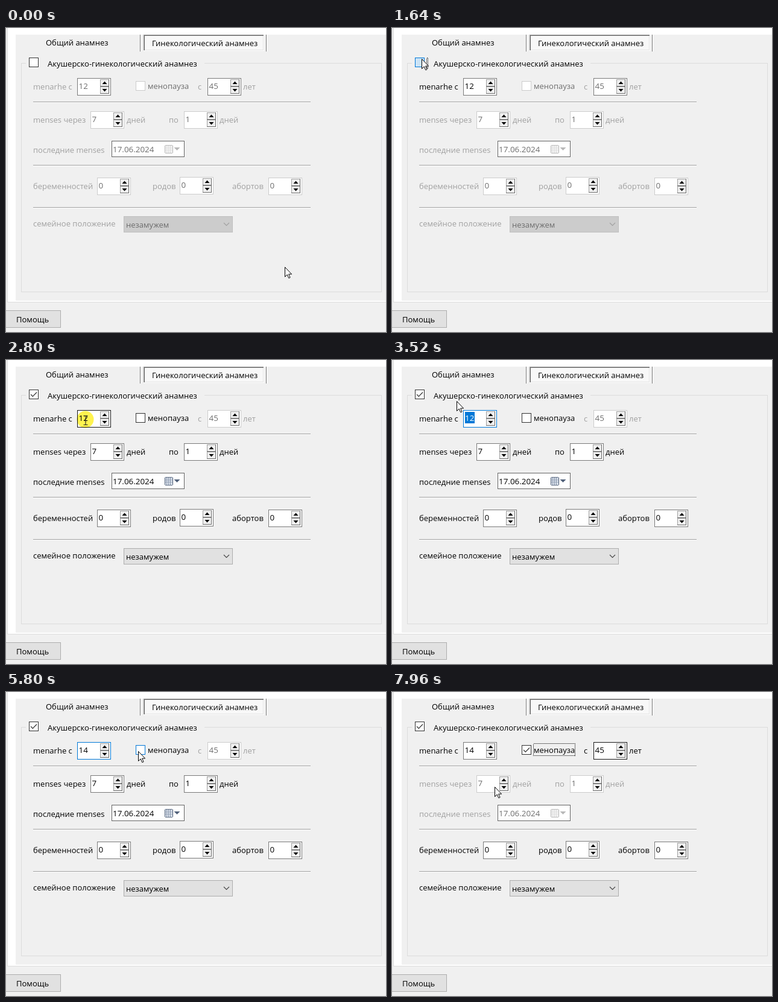
An HTML page for the animation above (8000 ms loop, 630 by 504 pixels).

```html
<!DOCTYPE html>
<html lang="ru">
<head>
<meta charset="utf-8">
<style>
html, body { margin: 0; width: 100%; height: 100%; overflow: hidden; background: #f0f0f0; }
svg { display: block; width: 630px; height: 504px; }
text { font: 13px "Open Sans", "Noto Sans", sans-serif; white-space: pre; }
.num { font-size: 13.4px; }
.glow { mix-blend-mode: multiply; }
rect { shape-rendering: crispEdges; }
</style>
</head>
<body>
<svg id="stage" viewBox="0 0 630 504"></svg>
<script>
const LOOP = 8000, STEP = 40, DIGIT = 7.6;
const BLACK = '#000', INK = '#333', BLUE = '#0078d7', GREY = '#a0a0a0', DIM = '#6d6d6d';
const EDGE = '#7a7a7a', PALE = '#cccccc', HOVER = '#171717', PRESSED = '#cce4f7';

// Pointer moves: start, end, target x, target y, sideways overshoot
const HOME = [462, 396];
const MOVES = [
  [80, 280, 462, 391, 0],
  [440, 1200, 49, 51, 1.4],
  [2160, 2520, 132, 100, 0],
  [2800, 3160, 107, 68, 0],
  [4000, 4960, 140, 56, 0],
  [5000, 5800, 219, 98, 5.1],
  [6320, 7160, 364, 94, 0],
  [7600, 7720, 236, 153, 0],
  [7840, 7960, 170, 157, 0]
];

const within = (t, a, b) => t >= a && t < b;
const smooth = k => k * k * (3 - 2 * k);

function pointerAt(t) {
  let [x, y] = HOME;
  for (const [start, end, tx, ty, over] of MOVES) {
    if (t < start) break;
    const k = Math.min(1, (t - start) / (end - start)), e = smooth(k);
    x += (tx - x) * (e + over * k * k * (1 - k));
    y += (ty - y) * e;
  }
  return [Math.round(x), Math.round(y)];
}

const fill = (x, y, w, h, c) => `<rect x="${x}" y="${y}" width="${w}" height="${h}" fill="${c}"/>`;
const box = (x, y, w, h, c, line, extra = '') =>
  `<rect x="${x + .5}" y="${y + .5}" width="${w - 1}" height="${h - 1}" fill="${c}" stroke="${line}" ${extra}/>`;
const text = (x, y, s, c = BLACK, cls = '') => `<text x="${x}" y="${y}" fill="${c}" class="${cls}">${s}</text>`;
const path = (d, c, line = 'none', width = 1) => `<path d="${d}" fill="${c}" stroke="${line}" stroke-width="${width}"/>`;
const dotted = (x, y, w, h) => box(x, y, w, h, 'none', BLACK, 'stroke-dasharray="1 1"');
const ink = on => on ? BLACK : GREY;
const edge = on => on ? EDGE : PALE;

function spinButton(x, y, dir) {
  return fill(x, y, 15, 12, '#696969') + fill(x, y, 14, 11, GREY) + fill(x + 1, y + 1, 13, 10, '#f0f0f0') +
    path(`M${x + 3.5} ${y + 6 + 2 * dir}h8l-4 ${-4.5 * dir}z`, BLACK);
}

function spin(x, y, value, on, line = edge(on)) {
  return box(x, y, 56, 29, '#fff', line) + text(x + 2.5, y + 17.5, value, on ? BLACK : DIM, 'num') +
    spinButton(x + 38, y + 2, 1) + spinButton(x + 38, y + 14, -1);
}

function check(x, y, on, line, bg = '#fff') {
  return box(x, y, 16, 16, bg, line) +
    (on ? path(`M${x + 3} ${y + 8}l3.3 3.3l6.7-6.8`, 'none', line, 1.2) : '');
}

function sunken(x, y, w, h) {
  return fill(x, y, w, h, '#fff') + fill(x, y, w - 1, h - 1, GREY) + fill(x + 1, y + 1, w - 2, h - 2, '#696969') +
    fill(x + 2, y + 2, w - 3, h - 3, '#e3e3e3') + fill(x + 2, y + 2, w - 4, h - 4, '#f8f8f8');
}

function frame() {
  let s = fill(0, 0, 630, 504, '#f0f0f0') + fill(2, 0, 628, 455, '#dcdcdc') +
    fill(3, 0, 627, 454, '#fff') + fill(16, 11, 614, 441, '#f0f0f0');
  for (const x of [222, 431]) s += fill(x, 11, 1, 28, EDGE) + fill(x + 1, 11, 1, 28, '#fff');
  s += sunken(228, 11, 200, 27) + text(66, 29, 'Общий анамнез') + text(242, 30, 'Гинекологический анамнез');
  s += box(25, 58, 598, 380, 'none', '#dcdcdc') + fill(33, 56, 296, 5, '#f0f0f0') +
    text(69, 64, 'Акушерско-гинекологический анамнез');
  for (const y of [122, 227, 297]) s += fill(45, y, 460, 1, GREY) + fill(45, y + 1, 460, 1, '#fff');
  return s + box(-1, 468, 92, 29, '#e1e1e1', '#adadad') + text(17, 488, 'Помощь');
}

function dateBox(on) {
  const line = on ? '#51617a' : '#b8b8b8', grid = on ? '#8f9db2' : '#e0e0e0';
  let s = box(175, 187, 121, 27, '#fff', '#646464') + text(177, 205.5, '17.06.2024', on ? BLACK : DIM, 'num') +
    box(263, 194, 14, 14, on ? '#e4eaf2' : '#f4f4f4', line, 'rx="2"');
  for (let i = 0; i < 3; i++) s += fill(264, 197 + i * 3, 12, 1, grid) + fill(266 + i * 3, 195, 1, 12, grid);
  return s + path('M278.5 198h10l-5 5z', line);
}

function combo(on) {
  return box(195, 312, 181, 27, on ? '#e1e1e1' : PALE, on ? '#adadad' : '#bfbfbf') +
    text(199, 331, 'незамужем', on ? BLACK : DIM) +
    path('M361 323l4.5 4.5l4.5-4.5', 'none', on ? '#444' : GREY, 1.1);
}

function form(t) {
  const first = t >= 1600, all = t >= 1720, meno = t >= 6400, cycle = all && !meno;
  const value = t < 4000 ? '12' : t < 4240 ? '1' : '14';
  const ageLine = within(t, 2400, 2880) ? HOVER : within(t, 2880, 6320) ? BLUE : EDGE;
  const endLine = t >= 7120 ? HOVER : edge(!cycle);
  const menoLine = within(t, 5600, 7160) ? BLUE : all ? INK : PALE;

  let s = check(38, 49, all, within(t, 1160, 2280) ? BLUE : INK, within(t, 1480, 1720) ? PRESSED : '#fff');
  if (within(t, 80, 2800)) s += dotted(57, 49, 3, 18);

  s += text(45, 102, 'menarhe с', ink(first)) + spin(118, 83, value, first, ageLine) +
    check(215, 88, meno, menoLine, within(t, 6280, 6400) ? PRESSED : '#fff') +
    text(235, 101, 'менопауза', all ? BLACK : DIM) + text(318, 102, 'с', ink(meno)) +
    spin(334, 83, '45', meno, endLine) + text(393, 102, 'лет', ink(meno));
  if (t >= 6320) s += dotted(234, 85, 70, 21);

  s += text(45, 157, 'menses через', ink(cycle)) + spin(140, 138, '7', cycle) + text(200, 157, 'дней', ink(cycle)) +
    text(270, 157, 'по', ink(cycle)) + spin(295, 138, '1', cycle) + text(354, 157, 'дней', ink(cycle)) +
    text(45, 207, 'последние menses', ink(cycle)) + dateBox(cycle);

  s += text(45, 267, 'беременностей', ink(all)) + spin(151, 248, '0', all) +
    text(243, 267, 'родов', ink(all)) + spin(288, 247, '0', all) +
    text(375, 267, 'абортов', ink(all)) + spin(435, 248, '0', all);
  return s + text(45, 329, 'семейное положение', ink(all)) + combo(all);
}

function editing(t) {
  let s = '';
  if (within(t, 2920, 4000)) {
    const from = t < 3000 ? 1 : 0, x = 121 + from * DIGIT;
    s += fill(x, 86, 137 - x, 19, BLUE) + text(x, 100.5, '12'.slice(from), '#fff', 'num');
  }
  const typed = t < 4000 ? 0 : t < 4240 ? 1 : 2;
  const caret = within(t, 3000, 3520) || within(t, 4000, 4720) || within(t, 5200, 5720);
  return caret ? s + fill(Math.round(121.5 + typed * DIGIT), 86, 1, 19, BLACK) : s;
}

function pointer(t) {
  if (within(t, 4000, 5000)) return '';
  const [x, y] = pointerAt(t), drag = within(t, 2800, 3120);
  let s = '';
  if (drag || within(t, 1440, 1600) || within(t, 6280, 6400))
    s += `<circle class="glow" cx="${x - .5}" cy="${y - 1.5}" r="14" fill="#fff23c" opacity=".9"/>`;
  if (drag || within(t, 2440, 2800) || within(t, 7000, 7640))
    return s + path(`M${x - 3.5} ${y - 7.5}h3l.5 .5l.5-.5h3M${x} ${y - 7}v14M${x - 3.5} ${y + 7.5}h3l.5-.5l.5 .5h3`,
      'none', '#222', 1.1);
  return s + path(`M${x + .5} ${y + .5}v16l3.7-3.6l2.6 5.8l2.3-1l-2.5-5.6h5z`, '#fff', BLACK);
}

const stage = document.getElementById('stage');
const backdrop = frame();
const start = performance.now();
let shown = -1;

function render(now) {
  const t = Math.floor((now % LOOP) / STEP) * STEP;
  if (t === shown) return;
  shown = t;
  stage.innerHTML = backdrop + form(t) + editing(t) + pointer(t);
}

function tick() {
  render(performance.now() - start);
  requestAnimationFrame(tick);
}
tick();
</script>
</body>
</html>
```
